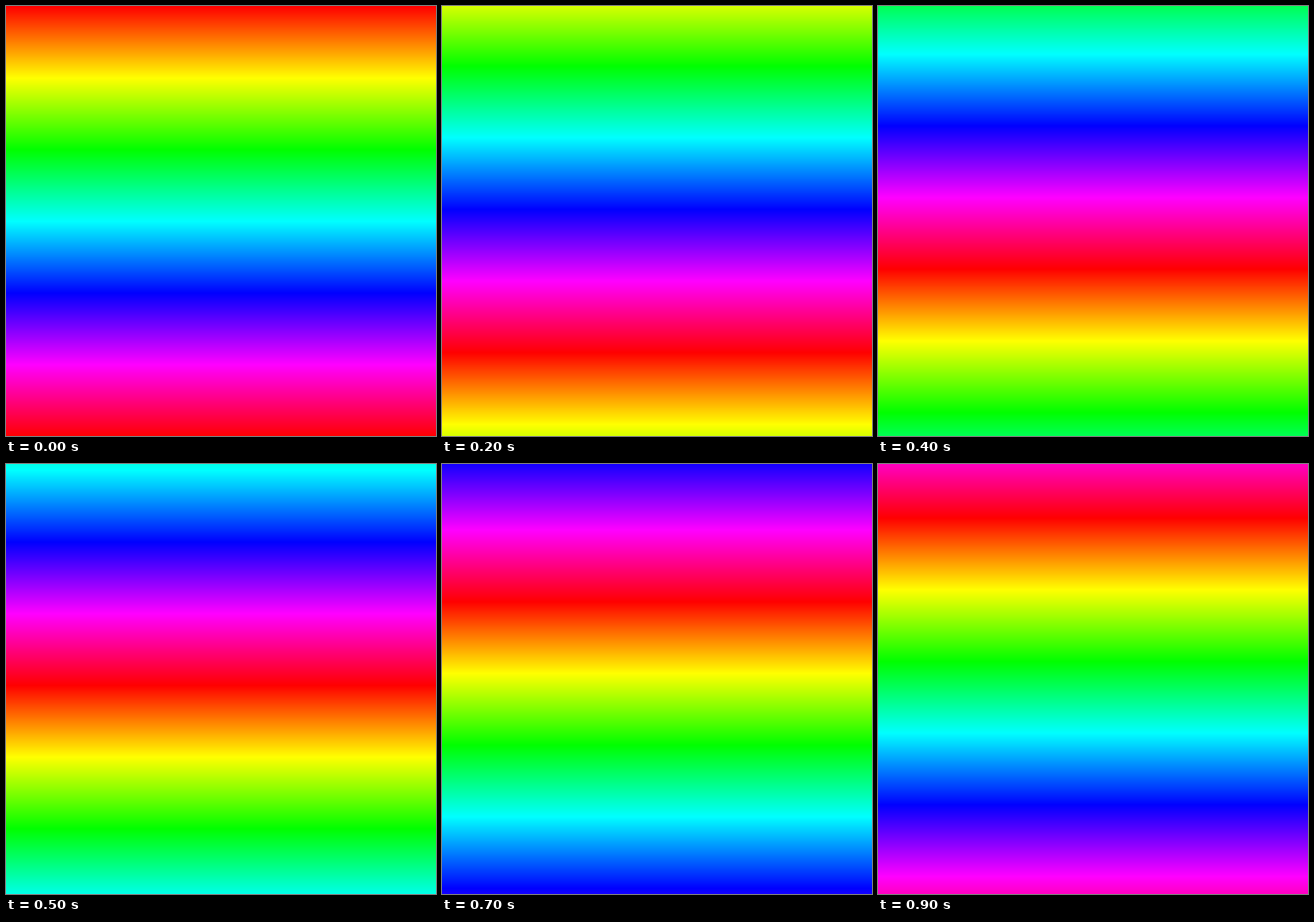
An HTML page with a canvas for the animation above (1000 ms loop, 500x500 px).

```html
<!DOCTYPE html>
<html lang="en">
<head>
<meta charset="utf-8">
<title>Rainbow scroll</title>
<style>
  html, body { margin: 0; width: 100%; height: 100%; overflow: hidden; }
  canvas { display: block; width: 100%; height: 100%; }
</style>
</head>
<body>
<canvas id="stage" width="500" height="500"></canvas>
<script>
  const SIZE = 500, STEP_MS = 100, STEPS = 10, HUE_STEP = 35;
  const ctx = document.getElementById("stage").getContext("2d");
  const start = performance.now();
  let shown = -1;

  function draw(step) {
    for (let y = 0; y < SIZE; y++) {
      const hue = (y / SIZE * 360 + step * HUE_STEP) % 360;
      ctx.fillStyle = `hsl(${hue}, 100%, 50%)`;
      ctx.fillRect(0, y, SIZE, 1);
    }
  }

  function tick() {
    const elapsed = Math.max(0, performance.now() - start);
    const step = Math.floor(elapsed / STEP_MS) % STEPS;
    if (step !== shown) draw(shown = step);
    requestAnimationFrame(tick);
  }

  tick();
</script>
</body>
</html>
```
